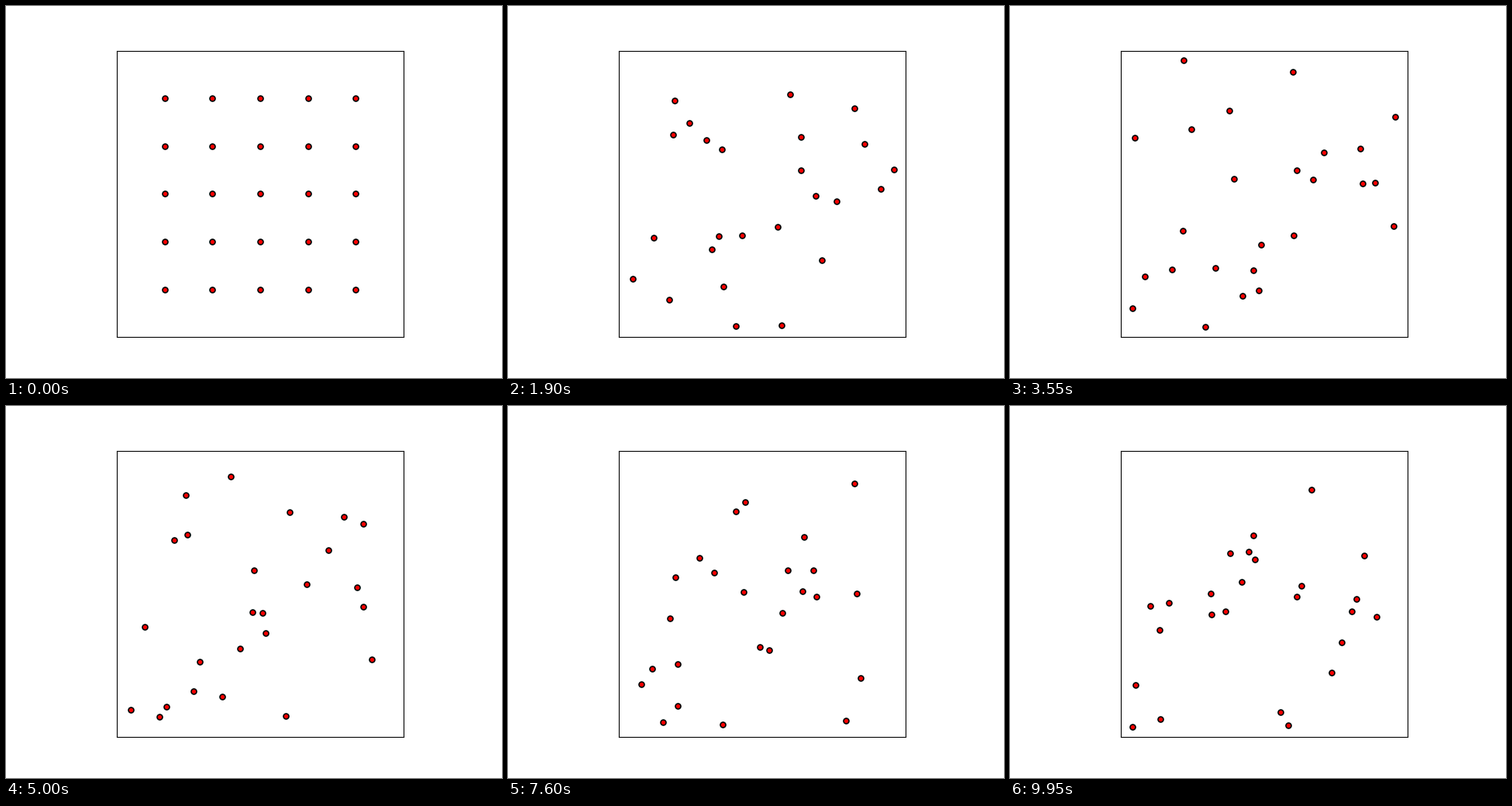
Write a matplotlib script that moves like this. It is 640x480 px and loops after 10000 ms.

```python
import numpy as np
import matplotlib.pyplot as plt
from matplotlib.animation import FuncAnimation

FRAMES, INTERVAL = 200, 50
SUBSTEPS = 10
DT = INTERVAL / 1000 / SUBSTEPS
CENTRE = np.array([328, 242.4])
UNIT = 61.6
REACH = 2.8 * UNIT       # farthest a ball's centre gets from the middle
DIAMETER = 0.2 * UNIT

# Launch velocities on the 5 x 5 grid, pixels per second, y downwards.
VX = [[22.7, -17.3, 30, 30.2, 4.6],
      [5.5, -23.7, 26.3, -17, 15.5],
      [-8.7, 4.8, -13.7, -22, 27.5],
      [30.5, 6.3, -29.7, 4, -14.2],
      [-28.9, -30.6, -18, -19.3, -24.1]]
VY = [[22, 27.7, 17, 6.6, 30.8],
      [-31.2, -12.6, 16.4, -26, 29.2],
      [30, -30.3, 28.2, 22.4, -16.5],
      [5.3, 30.5, -3.9, -31, -27.4],
      [-7.2, 7, 25, 27.5, -19.7]]


def bounce_walls(pos, vel):
    offset = pos - CENTRE
    leaving = (np.abs(offset) > REACH) & (offset * vel > 0)
    vel[leaving] *= -1


def bounce_pairs(pos, vel):
    """Elastic knock between equal balls that touch and still approach."""
    gap = pos[:, None] - pos[None]
    dist = np.hypot(gap[..., 0], gap[..., 1])
    for i, j in np.argwhere(np.triu(dist < DIAMETER, 1)):
        normal = gap[i, j] / dist[i, j]
        closing = (vel[i] - vel[j]) @ normal
        if closing < 0:
            vel[i] -= closing * normal
            vel[j] += closing * normal


def simulate():
    grid = np.arange(-2, 3) * UNIT
    gx, gy = np.meshgrid(grid, grid)
    pos = CENTRE + np.column_stack([gx.ravel(), gy.ravel()])
    vel = np.column_stack([np.ravel(VX), np.ravel(VY)])
    track = []
    for _ in range(FRAMES):
        track.append(pos.copy())
        for _ in range(SUBSTEPS):
            pos += vel * DT
            bounce_pairs(pos, vel)
            bounce_walls(pos, vel)
    return track


TRACK = simulate()

fig, ax = plt.subplots(figsize=(6.4, 4.8), dpi=100)
ax.set(xlim=(143.2, 512.8), ylim=(427.2, 57.6), aspect="equal",
       xticks=[], yticks=[])
balls, = ax.plot([], [], "o", ms=5, mfc="red", mec="black", mew=1.2)


def draw(frame):
    balls.set_data(*TRACK[frame].T)
    return balls,


anim = FuncAnimation(fig, draw, frames=FRAMES, interval=INTERVAL,
                     repeat=True, repeat_delay=0)
plt.show()
```
